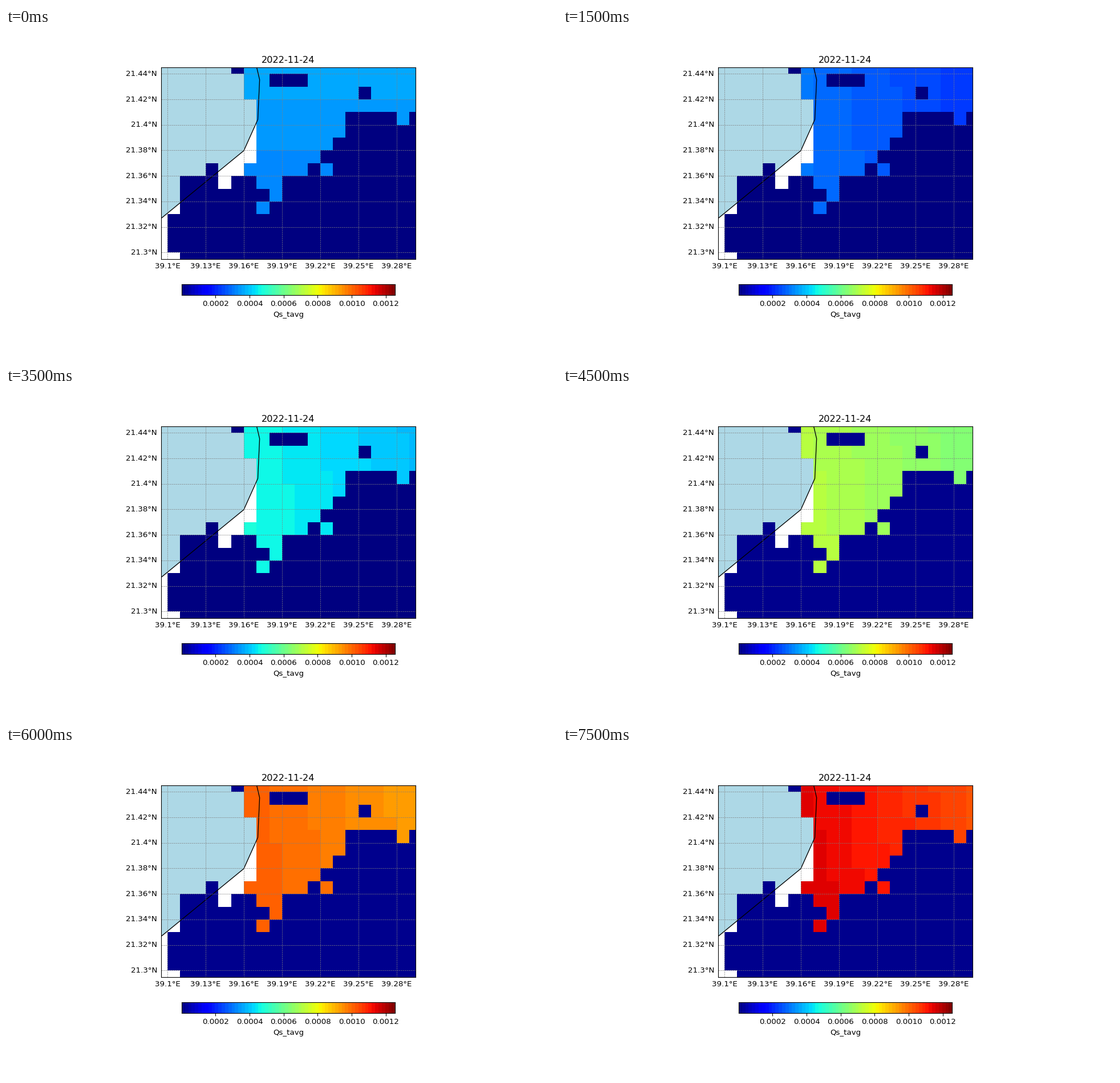
Animation, 966 px wide and 580 px high, one loop 8000 ms. Source, as a matplotlib script:

```python
import numpy as np
import matplotlib.pyplot as plt
from matplotlib.animation import FuncAnimation

W, H, DPI = 966, 580, 96.6
STEP, FRAMES = 500, 16          # ms per frame, frames per loop
BANDS = 64

plt.rcParams["font.family"] = "DejaVu Sans"
jet = plt.get_cmap("jet")

LON0, LON1, LAT0, LAT1 = 39.095, 39.295, 21.295, 21.445
COAST = [(39.1699, 21.4460), (39.1724, 21.4354), (39.1710, 21.4042),
         (39.1600, 21.3798), (39.0940, 21.3259)]

# Cells of 0.01 degree, counted from the north-west corner
ROW, COL = np.indices((16, 21))


def flip(mask, *cells):
    for c, r in cells:
        mask[r, c] ^= True


# Land begins at the shore column of each row
shore = np.repeat([6, 7, 8, 7, 2, 1, 2], [1, 2, 5, 1, 3, 3, 1])
land = COL >= shore[:, None]
flip(land, (4, 8), (5, 9))

# Runoff fills the north and a wedge along the diagonal
wet = land & (COL > 6 + (ROW > 8)) & (
    (ROW < 4) | ((COL + ROW < 20) & (ROW < 12)))
flip(wet, (9, 1), (10, 1), (11, 1), (16, 2), (15, 4), (19, 4),
     (13, 8), (10, 9), (8, 10))


def runoff(ms):
    """Tilted plane of runoff, in colour bands."""
    west = np.interp(ms, [0, 500, 1500, 2500, 3500, 4500, 6000, 7500],
                     [18.6, 14.2, 14.8, 19.1, 23.4, 35.8, 51, 57.7])
    east_fall = np.interp(ms, [0, 500, 6000, 7500], [0.01, 0.3, 0.32, 0.42])
    south_rise = np.interp(ms, [0, 500, 3500, 7500], [-0.23, 0, 0.05, 0.09])
    return west - east_fall * (COL - 8) + south_rise * ROW


def cell_colors(ms):
    rgba = jet((np.floor(runoff(ms)) + 0.5) / BANDS)
    rgba[~wet] = jet(0.012 if ms > 4000 else 0.0)
    rgba[~land] = 0
    return rgba


def px_axes(left, top, right, bottom):
    return fig.add_axes([left / W, 1 - bottom / H,
                         (right - left) / W, (bottom - top) / H])


# The tiny margin keeps the pixel size from rounding down
fig = plt.figure(figsize=((W + 1e-6) / DPI, (H + 1e-6) / DPI), dpi=DPI,
                 facecolor="white")

# Map
ax = px_axes(271.9, 69.1, 718.2, 404.6)
ax.fill(*zip(*COAST, (39.09, 21.3259), (39.09, 21.446)),
        color="lightblue", lw=0, zorder=0)
mesh = ax.pcolormesh(39.09 + 0.01 * np.arange(22), 21.45 - 0.01 * np.arange(17),
                     cell_colors(0), zorder=1)
ax.plot(*zip(*COAST), color="black", lw=1, zorder=1.5)
ax.set(xlim=(LON0, LON1), ylim=(LAT0, LAT1), xticks=[], yticks=[])
ax.set_title("2022-11-24")

grid = dict(color="gray", lw=0.5, ls="--", zorder=2)
label = dict(textcoords="offset points")
for lon in 39.10 + 0.03 * np.arange(7):
    ax.axvline(lon, **grid)
    ax.annotate(f"{round(lon, 2):g}°E", (lon, LAT0), xytext=(0, -5),
                ha="center", va="top", **label)
for lat in 21.30 + 0.02 * np.arange(8):
    ax.axhline(lat, **grid)
    ax.annotate(f"{round(lat, 2):g}°N", (LON0, lat), xytext=(-5, 0),
                ha="right", va="center", **label)

# Colour bar
bar = px_axes(307.9, 449.1, 682.2, 467.8)
bar.pcolormesh(np.linspace(1.5e-6, 0.0012544, BANDS + 1), [0, 1],
               jet((np.arange(BANDS) + 0.5) / BANDS)[None])
ticks = 0.0002 * np.arange(1, 7)
bar.set_xticks(ticks, [f"{t:.4f}" for t in ticks])
bar.set_yticks([])
bar.set_xlabel("Qs_tavg")


def update(i):
    mesh.set_array(cell_colors(i * STEP))
    return [mesh]


anim = FuncAnimation(fig, update, frames=FRAMES, interval=STEP,
                     repeat=True, repeat_delay=0, blit=False)
plt.show()
```
